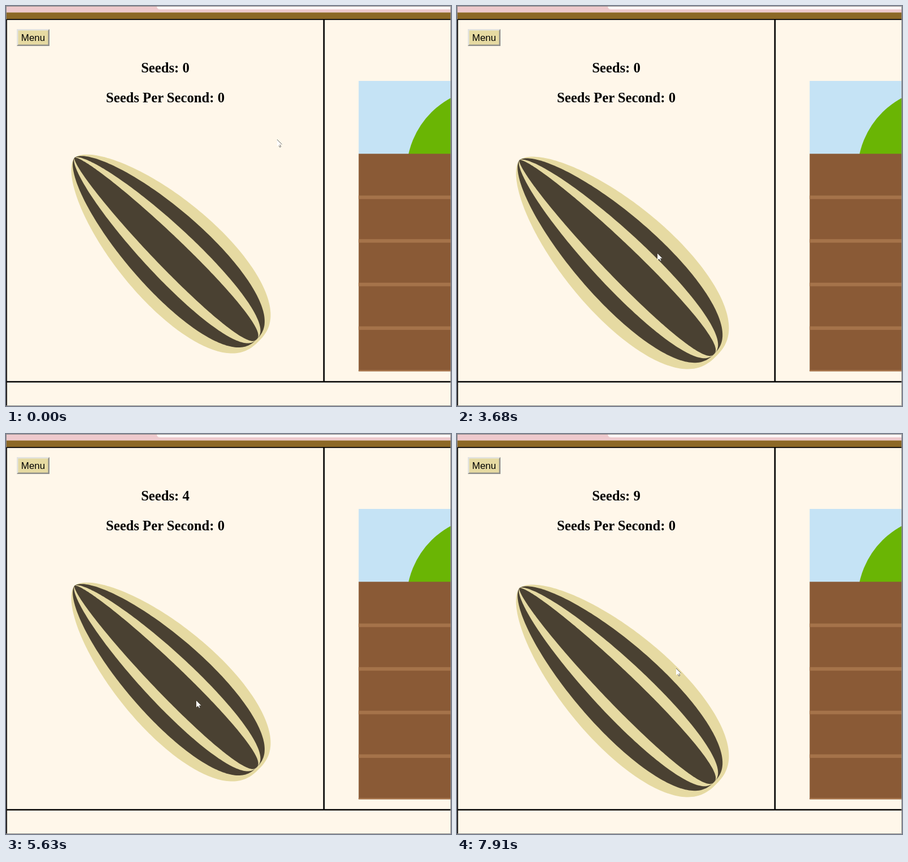
Animation of 788 by 710 pixels, one loop 8000 ms. Source, as an HTML page:

```html
<!DOCTYPE html>
<html lang="en">
<head>
<meta charset="utf-8">
<title>Seed clicker</title>
<style>
  html, body { margin: 0; width: 100%; height: 100%; overflow: hidden; background: #fff7ea; }
  svg { display: block; width: 788px; height: 710px; }
  .head { font: bold 24.7px "Liberation Serif", "Times New Roman", serif; text-anchor: middle; }
  .menu { font: 16.9px "Liberation Sans", Arial, sans-serif; text-anchor: middle; }
</style>
</head>
<body>
<svg viewBox="0 0 788 710">
  <rect width="788" height="710" fill="#fff7ea"/>

  <!-- window top -->
  <rect width="788" height="11.5" fill="#eec9cd"/>
  <path d="M267 0H788V6H273Q267 6 267 0Z" fill="#fdf6f6"/>
  <rect y="11.5" width="788" height="12" fill="#8c6826"/>

  <!-- panel borders -->
  <path d="M0 23.8H788M1 23V710" stroke="#000" stroke-width="1.7"/>
  <path d="M563 24V667M1 667H788" stroke="#000" stroke-width="2.7"/>

  <!-- menu button -->
  <rect x="19" y="41" width="58" height="30" fill="#e6daa2"/>
  <path d="M19 71V41H77L74.5 43.5H21.5V68.5Z" fill="#e3e3e1"/>
  <path d="M19 71H77V41L74.5 43.5V68.5H21.5Z" fill="#8f8f8c"/>
  <text class="menu" x="48" y="62">Menu</text>

  <text class="head" x="282" y="118" id="count">Seeds: 0</text>
  <text class="head" x="282" y="171">Seeds Per Second: 0</text>

  <!-- garden -->
  <rect x="624.5" y="133" width="164" height="130" fill="#c5e3f5"/>
  <circle cx="859.3" cy="294.9" r="150" fill="#6ab504"/>
  <rect x="624.5" y="262.3" width="164" height="386" fill="#8a5a36"/>
  <g id="rows" fill="#a5734a"></g>

  <g id="seed"><g id="shape" transform="translate(121.3 269.3) rotate(45)"></g></g>

  <g id="cursor">
    <path d="M0 0V12L2.8 9.6L4.8 13.6L6.8 12.7L5 8.8H8.6Z" fill="#fff"/>
    <path d="M0 0L8.6 8.6M5 8.8L6.8 12.7L4.8 13.6L3.4 10.8" fill="none" stroke="#45423e" stroke-width=".8"/>
  </g>

  <path d="M0 .5H787.5V709.5H0" fill="none" stroke="#8a8785"/>
  <path d="M.5 0V24" stroke="#8a8785"/>
</svg>
<script>
const NS = "http://www.w3.org/2000/svg";
const $ = id => document.getElementById(id);

function add(parent, tag, attrs) {
  const el = document.createElementNS(NS, tag);
  for (const key in attrs) el.setAttribute(key, attrs[key]);
  parent.append(el);
}

for (let i = 0; i < 5; i++) {
  add($("rows"), "rect", { x: 624.5, y: 336.4 + 77.4 * i, width: 164, height: i < 4 ? 6.3 : 2.4 });
}

// Half width of the seed at s = 0 (tip) to 1 (round end), with its peak of 1 at 0.6.
const profile = s => (s / .6) ** .6 * ((1 - s) / .4) ** .4;

function layer(length, width, fill) {
  const pts = [];
  for (let i = 0; i < 240; i++) {
    const a = i / 240 * 2 * Math.PI;
    const s = (1 - Math.cos(a)) / 2;
    const y = Math.sign(Math.sin(a)) * width * profile(s);
    pts.push((s * length).toFixed(2) + "," + y.toFixed(2));
  }
  add($("shape"), "polygon", { points: pts.join(" "), fill });
}

const PALE = "#e6daa2", DARK = "#4a4132";
layer(461, 92, PALE);
layer(456, 71.5, DARK);
layer(456, 45.5, PALE);
layer(456, 27.5, DARK);

const LOOP = 8000;
const HOVER_AT = 2440;
const HOVER = "translate(106 269) scale(1.068) translate(-117 -265)";

// time, x, y, number of jumps to the next point
const path = [
  [0, 480, 237, 1], [250, 465, 226, 2], [520, 401, 200, 1], [640, 736, 470, 1],
  [760, 702, 513, 3], [1200, 618, 555, 1], [1960, 596, 550, 2], [2200, 537, 485, 3],
  [2560, 340, 436, 3], [2920, 275, 353, 3], [3300, 369, 430, 3], [3680, 355, 439, 4],
  [4660, 353, 444, 6], [5510, 337, 473, 1], [7910, 388, 416, 1]
];

// mouse down, mouse up, seed counted
const clicks = [
  [3800, 4180, 4180], [4300, 4420, 4420], [4780, 4900, 4900],
  [5270, 5390, 5390], [5630, 5770, 5770], [5890, 6010, 6010],
  [6130, 6250, 6500], [6750, 7000, 6750], [7280, 7280, 7280]
];

function cursorAt(t) {
  const i = path.findLastIndex(p => p[0] <= t);
  const [t0, x0, y0, jumps] = path[i];
  const [t1, x1, y1] = path[i + 1] || [LOOP, x0, y0];
  const k = Math.floor((t - t0) / (t1 - t0) * jumps) / jumps;
  return [x0 + (x1 - x0) * k, y0 + (y1 - y0) * k];
}

const start = performance.now();

function draw() {
  const t = (performance.now() - start) % LOOP;
  const pressed = clicks.some(([down, up]) => t >= down && t < up);
  const big = t >= HOVER_AT && !pressed;
  $("cursor").setAttribute("transform", `translate(${cursorAt(t)})`);
  $("seed").setAttribute("transform", big ? HOVER : "translate(0 0)");
  $("count").textContent = "Seeds: " + clicks.filter(c => c[2] <= t).length;
  requestAnimationFrame(draw);
}
draw();
</script>
</body>
</html>
```
